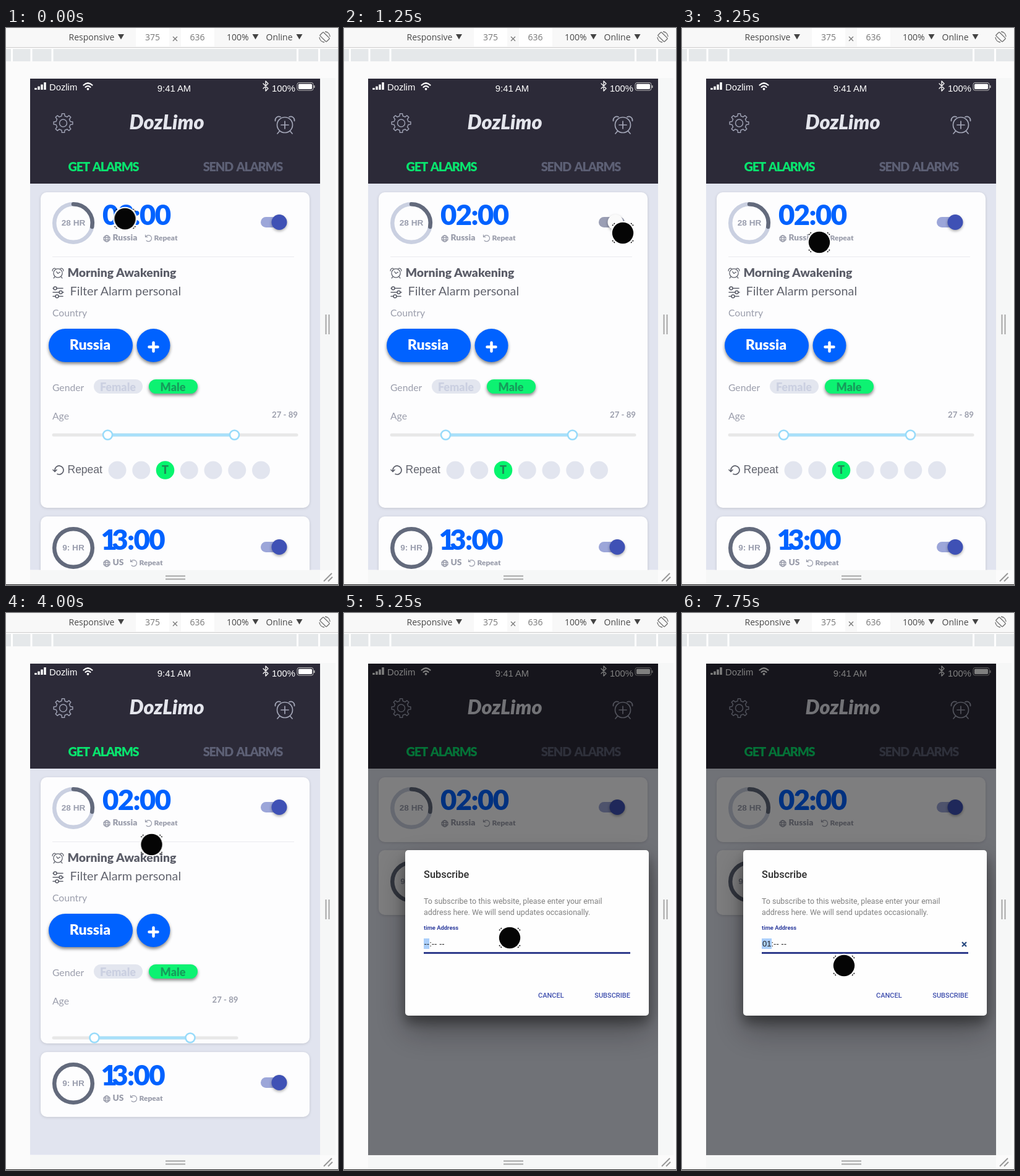
An HTML page that plays this animation: 537x902 px, repeating every 8 s.

```html
<!DOCTYPE html>
<html lang="en">
<head>
<meta charset="utf-8">
<title>Alarm app</title>
<style>
html, body { margin: 0; width: 100%; height: 100%; overflow: hidden; background: #fbfbfb; }
svg { display: block; width: 100vw; height: 100vh; }
text { font-family: Lato, sans-serif; white-space: pre; }
.mid { text-anchor: middle; }
.end { text-anchor: end; }
.tool text { font: 14px "Open Sans", sans-serif; fill: #484848; }
.tool .size { fill: #777; }
.status text { font: 14.8px "Liberation Sans", Arial, sans-serif; fill: #fff; }
.tab { font-size: 20px; font-weight: 900; letter-spacing: -1.3px; word-spacing: 3px; }
.clock { font-size: 45.5px; font-weight: 900; fill: #0062ff; letter-spacing: -1.6px; }
.hours { font: bold 13.6px "Liberation Sans", Arial, sans-serif; fill: #9a9eae; text-anchor: middle; }
.place { font-size: 13.8px; font-weight: 900; fill: #9a9dab; }
.again { font-size: 12px; font-weight: 900; fill: #9a9dab; }
.label { font-size: 15.7px; fill: #9b9eac; }
.range { font-size: 13.2px; font-weight: 700; fill: #9b9eac; text-anchor: end; }
.pill { font-size: 18px; font-weight: 900; text-anchor: middle; }
.line { fill: none; stroke-linecap: round; stroke-linejoin: round; }
.card { fill: #fdfdfe; filter: drop-shadow(0 1px 2px #0002); }
.lift { filter: drop-shadow(0 3px 2.5px #0007); }
.knob { filter: drop-shadow(0 2px 2px #0005); }
.dialog text { font-family: Roboto, sans-serif; }
.dialog .field { font: 13px "Liberation Sans", Arial, sans-serif; fill: #222; }
.dialog .action { font-size: 11px; font-weight: 500; fill: #3f4fae; }
.sheet { filter: drop-shadow(0 12px 9px #0005) drop-shadow(0 20px 24px #0005); }

.first, .second, .full, .half, .body, .modal, .empty, .typed, .track, .thumb, .pointer {
  animation: 8s step-end infinite;
}
.first { animation-name: fold; }
.second { animation-name: rise; }
.full { animation-name: full; }
.half { animation-name: half; }
.body { animation-name: body; }
.modal { animation-name: modal; }
.empty { animation-name: empty; }
.typed { animation-name: typed; }
.track { animation-name: track; }
.thumb { animation-name: thumb; }
.pointer { animation-name: pointer; }

@keyframes fold { 0% { height: 511px } 50% { height: 431px } 53.125% { height: 105px } }
@keyframes rise { 0% { transform: none } 50% { transform: translateY(-80px) } 53.125% { transform: translateY(-407px) } }
@keyframes full { 0% { opacity: 1 } 50% { opacity: 0 } }
@keyframes half { 0% { opacity: 0 } 50% { opacity: 1 } 53.125% { opacity: 0 } }
@keyframes body { 0% { opacity: 1 } 53.125% { opacity: 0 } }
@keyframes modal { 0% { opacity: 0 } 53.125% { opacity: 1 } }
@keyframes empty { 0% { opacity: 1 } 93.75% { opacity: 0 } }
@keyframes typed { 0% { opacity: 0 } 93.75% { opacity: 1 } }
@keyframes track { 0% { fill: #9ca6d9 } 15.625% { fill: #9a9eb4 } 25% { fill: #9ca6d9 } }
@keyframes thumb {
  0% { fill: #3f51b5; transform: none }
  15.625% { fill: #fafafa; transform: translateX(-3px) }
  18.75% { fill: #fafafa; transform: translateX(-18px) }
  25% { fill: #3f51b5; transform: none }
}
@keyframes pointer {
  0% { transform: translate(192.5px, 309px) }
  3.125% { transform: translate(215px, 307px) }
  6.25% { transform: translate(275px, 309px) }
  9.375% { transform: translate(345px, 316px) }
  12.5% { transform: translate(410px, 326px) }
  15.625% { transform: translate(451px, 332px) }
  25% { transform: translate(455px, 335px) }
  28.125% { transform: translate(425px, 343px) }
  31.25% { transform: translate(380px, 349px) }
  34.375% { transform: translate(280px, 345px) }
  37.5% { transform: translate(178px, 307px) }
  40.625% { transform: translate(222px, 347px) }
  50% { transform: translate(235.5px, 375px) }
  53.125% { transform: translate(248px, 394.5px) }
  56.25% { transform: translate(254px, 415px) }
  59.375% { transform: translate(258px, 445px) }
  62.5% { transform: translate(262px, 491px) }
  65.625% { transform: translate(268px, 526px) }
  68.75% { transform: translate(240px, 545px) }
  71.875% { transform: translate(200px, 560px) }
  75% { transform: translate(178px, 564px) }
  78.125% { transform: translate(211px, 562px) }
  81.25% { transform: translate(267px, 570px) }
  84.375% { transform: translate(262px, 571px) }
}
</style>
</head>
<body>
<svg viewBox="0 0 537 902" preserveAspectRatio="none">
  <defs>
    <clipPath id="screen"><path d="M39 82H508V877.5H39z"/></clipPath>
    <path id="drop" d="M-5-4H5L0 4.5z" fill="#444"/>
    <g id="globe" class="line" stroke="#9a9dab" stroke-width="1.3">
      <circle r="5"/><ellipse rx="2.3" ry="5"/><path d="M-5-1.5H5M-5 2H5"/>
    </g>
    <path id="redo" class="line" d="M-4.2-2.6A5 5 0 1 1-3.4 3.7M-5-5.5V-2H-1.5"/>
    <g id="alarm" class="line">
      <circle r="12.5"/>
      <path d="M-15.5-6.5A6 6 0 0 1-7-13M15.5-6.5A6 6 0 0 0 7-13M-8.5 10L-12 14M8.5 10L12 14"/>
    </g>
  </defs>

  <!-- browser toolbar -->
  <g class="tool">
    <path d="M0 0H537V31H0z" fill="#f8f8f8"/>
    <path d="M210 0H264V30H210zM283 0H337V30H283z" fill="#fff"/>
    <path d="M0 31.5H537" stroke="#cdcdcd"/>
    <path d="M0 34H537V54H0z" fill="#e5e8ea"/>
    <path d="M9.5 34V54M41 34V54M75 34V54M471.5 34V54M506.5 34V54" stroke="#fff" stroke-width="3"/>
    <text x="101.5" y="20">Responsive</text><use href="#drop" x="186" y="14"/>
    <text class="size" x="225" y="20">375</text>
    <path d="M270 14l7 7m0-7l-7 7" stroke="#777" stroke-width="1.3"/>
    <text class="size" x="297.5" y="20">636</text>
    <text x="357" y="20">100%</text><use href="#drop" x="403.5" y="14"/>
    <text x="420.5" y="20">Online</text><use href="#drop" x="474.5" y="14"/>
    <g class="line" stroke="#6e6e6e" stroke-width="1.3" transform="translate(515.5 14.5)">
      <rect x="-4" y="-7.5" width="8" height="15" rx="1.5" transform="rotate(-45)"/>
      <path d="M1-8.5A8.5 8.5 0 0 1 8.5-1M-1 8.5A8.5 8.5 0 0 1-8.5 1"/>
    </g>
  </g>
  <path d="M508 81H533V878H508zM39 878H508V901H39z" fill="#f6f7f7"/>
  <path d="M517.5 464V496M522.5 464V496M258 887.5H290M258 892.5H290" stroke="#a6a6a6" stroke-width="2"/>
  <path d="M514 896L527 883M521 896L528 889" stroke="#999" stroke-width="2"/>
  <path d="M0 901.5H537" stroke="#222"/>

  <g clip-path="url(#screen)">
    <path d="M39 82H508V878H39z" fill="#e1e4ef"/>
    <path d="M39 82H508V252H39z" fill="#2c2a38"/>

    <g class="status">
      <path d="M48 100V97M53 100V94.5M58 100V91.5M63 100V88" stroke="#fff" stroke-width="3.5"/>
      <text x="70" y="101">Dozlim</text>
      <path class="line" d="M125.5 92.5Q132.5 86 139.5 92.5M128.5 95.8Q132.5 92 136.5 95.8" stroke="#fff" stroke-width="2.2"/>
      <circle cx="132.5" cy="98.8" r="1.9" fill="#fff"/>
      <text class="mid" x="272" y="103">9:41 AM</text>
      <path class="line" d="M416 90L424 98L420 102V86L424 90L416 98" stroke="#fff" stroke-width="1.3"/>
      <text x="430" y="103">100%</text>
      <rect x="471" y="88.5" width="26" height="12.5" rx="3" fill="none" stroke="#bbb"/>
      <rect x="473" y="90.5" width="22" height="8.5" rx="1.5" fill="#fff"/>
      <path d="M498.5 93V97" stroke="#bbb" stroke-width="2"/>
    </g>

    <g class="line" stroke="#9b9eb0" stroke-width="1.5" transform="translate(92.5 154)">
      <path id="gear"/><circle r="6"/>
    </g>
    <text class="mid" x="260" y="164" font-size="32.5" font-weight="900" font-style="italic" fill="#e4e5ec">DozLimo</text>
    <g class="line" stroke="#a2a5b6" stroke-width="1.7" transform="translate(451 157)">
      <use href="#alarm"/><path d="M-6 0H6M0-6V6"/>
    </g>
    <text class="tab mid" x="157.5" y="232" fill="#09e46e">GET ALARMS</text>
    <text class="tab mid" x="383" y="232" fill="#5d6075">SEND ALARMS</text>

    <!-- first alarm -->
    <rect class="card first" x="56" y="266" width="435" height="511" rx="10"/>
    <circle cx="109" cy="316" r="30.8" fill="none" stroke="#cad0e1" stroke-width="6.5"/>
    <path class="line" d="M109 285.2A30.8 30.8 0 0 1 139.2 322" stroke="#636a7c" stroke-width="6.5"/>
    <text class="hours" x="109" y="320">28 HR</text>
    <text class="clock" x="156" y="319">02:00</text>
    <use href="#globe" x="163" y="341"/>
    <text class="place" x="172.5" y="344">Russia</text>
    <use href="#redo" x="230.5" y="340.5" stroke="#9a9dab" stroke-width="1.2"/>
    <text class="again" x="239.5" y="344">Repeat</text>
    <rect class="track" x="412" y="306" width="42" height="17" rx="8.5" fill="#9ca6d9"/>
    <g class="knob"><circle class="thumb" cx="442" cy="314.5" r="12.5" fill="#3f51b5"/></g>

    <g class="body">
      <path d="M75 370.5H466" stroke="#ebebee"/>
      <g class="line" stroke="#5d606b" stroke-width="2.2" transform="translate(84 397) scale(.57)">
        <use href="#alarm"/><path d="M-4-4L0 1L6-3"/>
      </g>
      <text x="99.5" y="403" font-size="19.4" font-weight="900" fill="#5c5e69">Morning Awakening</text>
      <g class="line" stroke="#5d606b" stroke-width="1.5">
        <path d="M76 421.5H77M82 421.5H92M76 428H86M91 428H93M76 434.5H80M85 434.5H92"/>
        <circle cx="79.5" cy="421.5" r="2.5"/><circle cx="88.5" cy="428" r="2.5"/><circle cx="82.5" cy="434.5" r="2.5"/>
      </g>
      <text x="103.5" y="433" font-size="19.8" fill="#62646e">Filter Alarm personal</text>
      <text class="label" x="75" y="467">Country</text>
      <g class="lift" fill="#0062ff">
        <rect x="69" y="487" width="136" height="54" rx="27"/><circle cx="238.5" cy="514" r="27"/>
      </g>
      <text class="mid" x="136" y="521" font-size="23" font-weight="900" fill="#fff">Russia</text>
      <path class="line" d="M231.5 516.5H245.5M238.5 509.5V523.5" stroke="#fff" stroke-width="4.5"/>
      <text class="label" x="75" y="588">Gender</text>
      <rect x="142" y="569" width="79" height="23" rx="11.5" fill="#e3e6ef"/>
      <text class="pill" x="181" y="588" fill="#cbd0e1">Female</text>
      <rect class="lift" x="231" y="569" width="79" height="23" rx="11.5" fill="#0df272"/>
      <text class="pill" x="270" y="588" fill="#159d5b">Male</text>
      <text class="label" x="75" y="634">Age</text>
    </g>

    <g class="full">
      <text class="range" x="472" y="631">27 - 89</text>
      <g class="line" stroke-width="5">
        <path d="M77 659H470" stroke="#e8e8e8"/><path d="M164 659H369" stroke="#a8e0fa"/>
      </g>
      <g fill="#fff" stroke="#98dbfa" stroke-width="2.6">
        <circle cx="164.5" cy="659" r="7.5"/><circle cx="369.5" cy="659" r="7.5"/>
      </g>
      <path class="line" d="M79 718V716A7 7 0 1 1 83 722.3M76 715.5L79 718.5L82 715.5" stroke="#5d606b" stroke-width="1.7"/>
      <text x="99.5" y="721" style="font: 17.5px 'Liberation Sans', Arial, sans-serif" fill="#62646e">Repeat</text>
      <path class="line" d="M180 716H412.7" stroke="#e2e5ef" stroke-width="29" stroke-dasharray="0 38.75"/>
      <circle cx="257.5" cy="716" r="14.8" fill="#06f56e"/>
      <text class="pill" x="257.5" y="722" fill="#1c8c55">T</text>
    </g>
    <g class="half">
      <text class="range" x="375.5" y="631">27 - 89</text>
      <g class="line" stroke-width="5">
        <path d="M77 688H373" stroke="#e8e8e8"/><path d="M143 688H298" stroke="#a8e0fa"/>
      </g>
      <g fill="#fff" stroke="#98dbfa" stroke-width="2.6">
        <circle cx="143" cy="688" r="7.5"/><circle cx="298" cy="688" r="7.5"/>
      </g>
    </g>

    <!-- second alarm -->
    <g class="second">
      <rect class="card" x="56" y="791" width="435" height="105" rx="10"/>
      <circle cx="109" cy="842" r="30.8" fill="none" stroke="#636a7c" stroke-width="6.5"/>
      <text class="hours" x="109" y="846">9: HR</text>
      <text class="clock" x="153.5" y="845">1<tspan dx="-7">3:00</tspan></text>
      <use href="#globe" x="163" y="867"/>
      <text class="place" x="172.5" y="870">US</text>
      <use href="#redo" x="206.5" y="866.5" stroke="#9a9dab" stroke-width="1.2"/>
      <text class="again" x="215.5" y="870">Repeat</text>
      <rect x="412" y="832" width="42" height="17" rx="8.5" fill="#9ca6d9"/>
      <circle class="knob" cx="442" cy="840.5" r="12.5" fill="#3f51b5"/>
    </g>

    <g class="modal">
      <path d="M39 82H508V878H39z" opacity=".5"/>
      <g class="dialog">
        <rect class="sheet" x="99" y="384" width="394" height="268" rx="5" fill="#fefefe"/>
        <text x="129" y="429" font-size="16.4" font-weight="500" fill="#2e2e2e">Subscribe</text>
        <g font-size="12.45" fill="#808080">
          <text x="129" y="471">To subscribe to this website, please enter your email</text>
          <text x="129" y="489">address here. We will send updates occasionally.</text>
        </g>
        <text x="129" y="513" font-size="9.4" font-weight="700" fill="#303f9f">time Address</text>
        <g class="empty">
          <path d="M129 527H138V544H129z" fill="#abcffb"/>
          <text class="field" x="129.5" y="540">--:-- --</text>
        </g>
        <g class="typed">
          <path d="M129 527H145V544H129z" fill="#abcffb"/>
          <text class="field" x="130" y="540">01:-- --</text>
          <path d="M453 533l7 7m0-7l-7 7" stroke="#28497f" stroke-width="2.2"/>
        </g>
        <path d="M129 550.5H463" stroke="#303c8c" stroke-width="2.8"/>
        <text class="action" x="314" y="623">CANCEL</text>
        <text class="action end" x="463" y="623">SUBSCRIBE</text>
      </g>
    </g>
  </g>

  <g class="pointer">
    <circle r="19.3" fill="#fff"/>
    <circle r="17.2" fill="#050505"/>
    <path d="M-17-12L-12-17M17-12L12-17M-17 12L-12 17M17 12L12 17" stroke="#111" stroke-width="1.6" stroke-dasharray="2 1.5"/>
  </g>
</svg>
<script>
// Gear outline: eight teeth, four corners each.
const teeth = 8;
const corners = Array.from({ length: teeth * 4 }, (_, i) => {
  const angle = (Math.floor(i / 4) + [-.28, -.17, .17, .28][i % 4]) * 2 * Math.PI / teeth;
  const radius = i % 4 === 1 || i % 4 === 2 ? 15.5 : 11.8;
  return [radius * Math.cos(angle), radius * Math.sin(angle)].map(v => v.toFixed(2));
});
document.getElementById("gear").setAttribute("d", "M" + corners.join("L") + "z");
</script>
</body>
</html>
```
